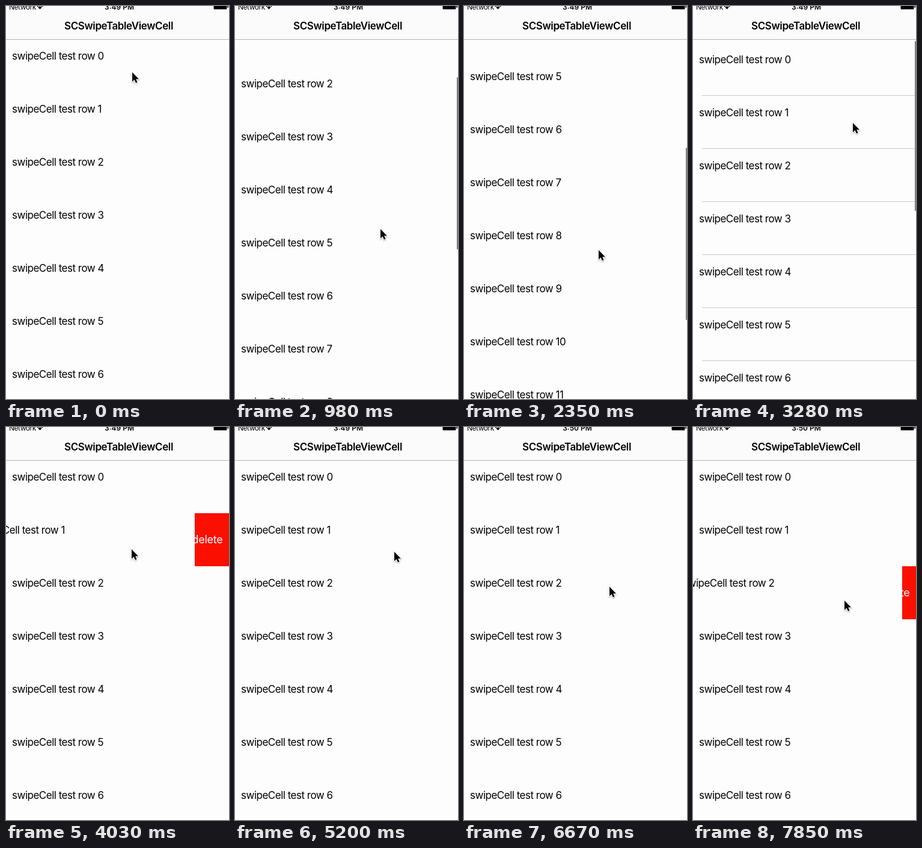
An HTML page that plays this animation: 371x652 px, repeating every 8 s.

```html
<!DOCTYPE html>
<html lang="en">
<head>
<meta charset="utf-8">
<title>Swipe table</title>
<style>
  html, body { margin: 0; width: 100%; height: 100%; overflow: hidden; background: #fdfdfd; }
  #stage { position: absolute; left: 0; top: 0; width: 371px; height: 652px; overflow: hidden;
    font: 17px/20px Inter, Roboto, sans-serif; color: #000; }
  #stage * { position: absolute; white-space: nowrap; box-sizing: border-box; }
  #list { left: 0; top: 55px; width: 375px; }
  .row { width: 375px; height: 88px; overflow: hidden; }
  .cell { width: 375px; height: 88px; background: #fdfdfd; }
  .cell span { left: 10px; top: 18px; letter-spacing: -.5px; }
  .button { left: 295px; width: 80px; height: 88px; background: #fb1000; color: #fff;
    font-size: 18px; line-height: 88px; letter-spacing: -.3px; text-align: center; }
  .line { left: 15px; top: 87px; width: 360px; height: 1px; background: #c8c7cc; }
  #bar { left: 0; top: 0; width: 375px; height: 56px; background: #fbfbfb; border-bottom: 1px solid #b2b2b2; }
  #title { left: 0; top: 23px; width: 375px; text-align: center; font-weight: 600; letter-spacing: -.4px; }
  .status { top: -6px; font-size: 12px; line-height: 15px; }
  #clock { left: 0; width: 377px; text-align: center; font-weight: 600; }
  #thumb { left: 369px; width: 3px; border-radius: 2px; background: #7f7f7f; }
  svg { left: 0; top: 0; overflow: visible; }
</style>
</head>
<body>
<div id="stage">
  <div id="list"></div>
  <div id="thumb"></div>
  <div id="bar">
    <span class="status" style="left:5px;letter-spacing:-.5px">Network</span>
    <span class="status" id="clock"></span>
    <svg width="371" height="8">
      <path d="M51 0Q56.500 -5 62 0L60.500 1.500Q56.500 -2 52.500 1.500ZM53.300 2.300Q56.500 -.600 59.700 2.300L56.500 5.500Z"/>
      <rect x="345.500" y="-4" width="22" height="9.500" rx="1.500"/>
      <rect x="368.500" y="-1" width="1.500" height="4" rx=".7"/>
    </svg>
    <span id="title">SCSwipeTableViewCell</span>
  </div>
  <svg id="cursor" width="14" height="20">
    <path d="M0 0V15.500L3.600 12.200 6 17.600 8.500 16.500 6.200 11.300H11Z" stroke="#fff" stroke-width="2" paint-order="stroke" style="filter:drop-shadow(0 1px 1px #0005)"/>
  </svg>
</div>
<script>
const LOOP = 8000, ROWS = 15, PITCH = 88;

// Moments at which the picture is refreshed.
const ticks = [0, 480, 840, 980, 1280, 1430, 1670, 1910, 2050, 2200, 2350, 2530, 2740, 3040,
  3280, 3430, 3580, 3730, 3880, 4030, 4170, 4320, 4470, 4610, 4760, 4910, 5050, 5200,
  5350, 5500, 5640, 5790, 5940, 6090, 6230, 6380, 6530, 6670, 6820, 6970, 7110, 7260, 7410, 7550, 7700, 7850];

const scrollKeys = [[0, 0], [480, 0], [840, 18], [980, 130], [1280, 480], [1430, 590], [1670, 652],
  [1910, 640], [2350, 406], [2530, 240], [2740, 70], [3040, -24], [3280, -6], [3430, 0]];
const cursorKeys = [[0, 210, 110], [480, 205, 106], [840, 236, 420], [980, 242, 370], [1280, 258, 240],
  [1670, 270, 186], [1910, 266, 196], [2350, 224, 405], [2740, 240, 390], [3280, 266, 194],
  [3580, 268, 198], [4170, 190, 204], [4760, 188, 217], [5200, 265, 207], [5640, 190, 206],
  [5940, 200, 225], [6380, 242, 265], [6670, 242, 265], [7110, 172, 270], [7550, 190, 280], [7850, 252, 288]];
const swipeKeys = {
  1: [[3580, 0], [4170, 80], [4760, 80], [5200, 0], [5640, 80], [6380, 80], [6530, 30], [6670, 0]],
  2: [[6670, 0], [7110, 80], [7550, 80], [7700, 60], [7850, 27]]
};

const $ = id => document.getElementById(id);

function at(keys, t, part = 1) {
  const next = keys.findIndex(k => k[0] > t);
  if (next === 0) return keys[0][part];
  if (next < 0) return keys[keys.length - 1][part];
  const a = keys[next - 1], b = keys[next];
  return a[part] + (b[part] - a[part]) * (t - a[0]) / (b[0] - a[0]);
}

function add(parent, name, text = '', tag = 'div') {
  const el = document.createElement(tag);
  el.className = name;
  el.textContent = text;
  return parent.appendChild(el);
}

const cells = [], lines = [];
for (let i = 0; i < ROWS; i++) {
  const row = add($('list'), 'row');
  row.style.top = i * PITCH + 'px';
  add(row, 'button', 'delete');
  const cell = add(row, 'cell');
  add(cell, '', 'swipeCell test row ' + i, 'span');
  cells.push(cell);
  lines.push(add(row, 'line'));
}

function draw(t) {
  const scroll = Math.round(at(scrollKeys, t));
  $('list').style.transform = `translateY(${-scroll}px)`;
  lines.forEach(line => line.style.visibility = scroll < 0 ? 'visible' : 'hidden');

  const thumb = $('thumb').style;
  thumb.visibility = t >= 840 && t < 3730 ? 'visible' : 'hidden';
  thumb.top = (scroll < 0 ? 58 : 62 + scroll * .427) + 'px';
  thumb.height = (scroll < 0 ? 288 + scroll : 286) + 'px';

  for (const i in swipeKeys)
    cells[i].style.transform = `translateX(${-Math.round(at(swipeKeys[i], t))}px)`;

  $('cursor').style.transform =
    `translate(${Math.round(at(cursorKeys, t))}px, ${Math.round(at(cursorKeys, t, 2))}px)`;
  $('clock').textContent = t < 5790 ? '3:49 PM' : '3:50 PM';
}

let shown = -1;
function frame() {
  const now = performance.now() % LOOP;
  const t = ticks.filter(v => v <= now).pop();
  if (t !== shown) draw(shown = t);
  requestAnimationFrame(frame);
}
frame();
</script>
</body>
</html>
```
